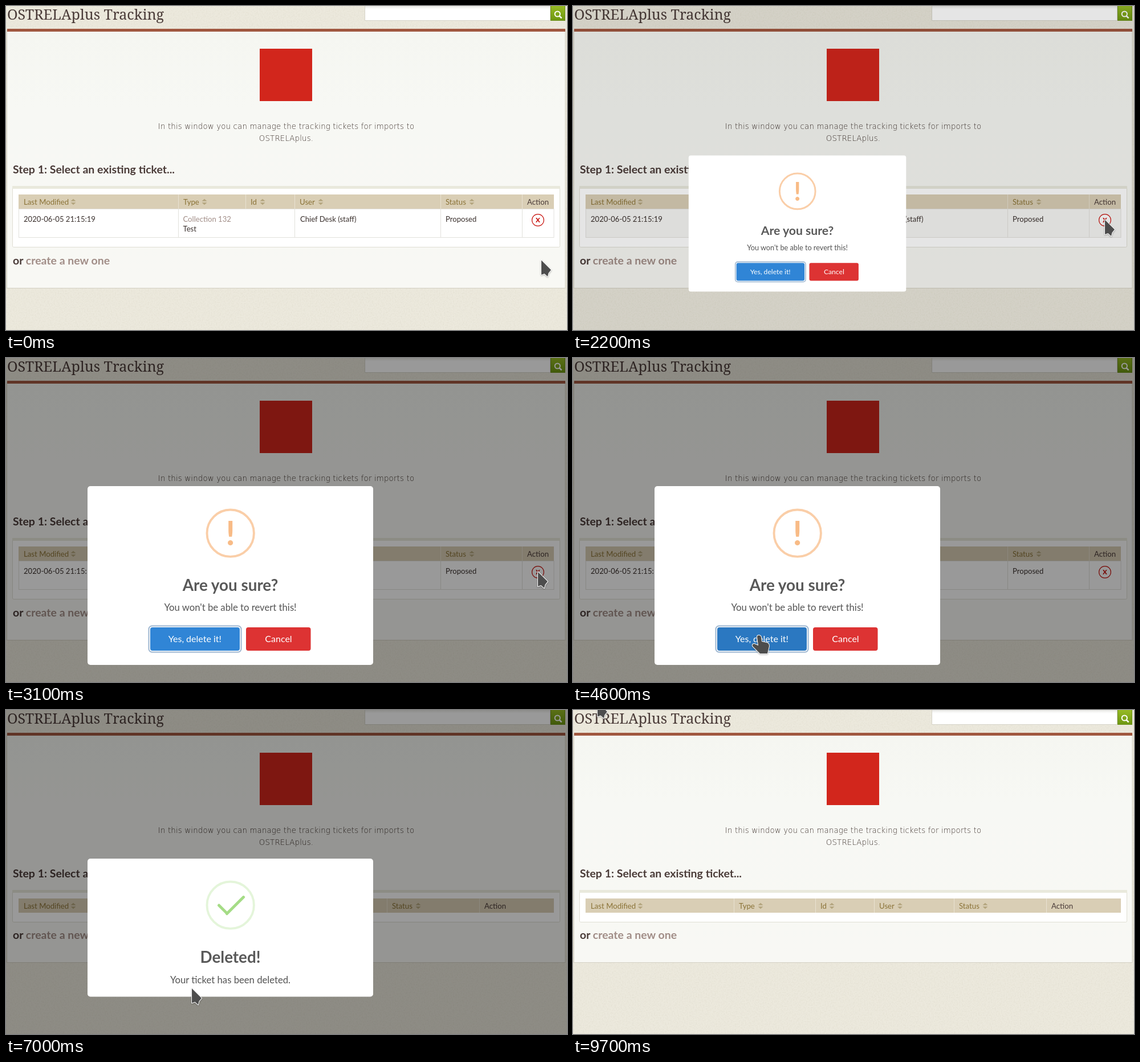
These frames come from a looping animation (984x569 px, 10000 ms). An HTML page:

```html
<!DOCTYPE html>
<html lang="en">
<head>
<meta charset="utf-8">
<title>Ticket tracking</title>
<style>
html, body { margin: 0; width: 100%; height: 100%; overflow: hidden; background: #e9e6da; }
svg { display: block; width: 984px; height: 569px; font-family: Lato, Cabin, sans-serif; }
.title { font: 25.1px "Noto Serif", serif; fill: #4a3b38; }
.intro { font: 200 13.3px "DejaVu Sans", sans-serif; letter-spacing: .18px; fill: #40342f; }
.head { font-size: 19.5px; font-weight: 700; fill: #4a3b38; }
.cell { font-size: 13.1px; fill: #3a302d; }
.th { font-size: 13.2px; fill: #8a7236; }
.link { fill: #a18d87; }
.mid { text-anchor: middle; }
.big { font-size: 27.8px; font-weight: 700; fill: #595959; }
.msg { font-size: 16.7px; fill: #545454; }
.btn { font-size: 16px; fill: #fff; }
#cursor { paint-order: stroke; filter: drop-shadow(0 1px 1px rgba(0,0,0,.3)); }
</style>
</head>
<body>
<svg id="stage" viewBox="0 0 984 569">
  <defs>
    <filter id="grain" x="0" y="0" width="1" height="1">
      <feTurbulence type="fractalNoise" baseFrequency=".45" numOctaves="2" seed="4"/>
      <feColorMatrix values="0 0 0 0 .35  0 0 0 0 .31  0 0 0 0 .2  .2 0 0 0 -.08"/>
    </filter>
    <linearGradient id="paper" x2="0" y2="1">
      <stop offset="0" stop-color="#f5f6f1"/><stop offset=".3" stop-color="#f7f8f4"/>
      <stop offset="1" stop-color="#f8f8f4"/>
    </linearGradient>
    <linearGradient id="green" x2="0" y2="1">
      <stop offset="0" stop-color="#97bb24"/><stop offset="1" stop-color="#6d9611"/>
    </linearGradient>
    <linearGradient id="inset" x2="0" y2="1">
      <stop offset="0" stop-color="#e6e6e2"/><stop offset=".25" stop-color="#fff"/>
    </linearGradient>
  </defs>

  <rect width="984" height="569" fill="#ece9dd"/>
  <rect width="984" height="569" filter="url(#grain)"/>
  <text class="title" x="2" y="23.5">OSTRELAplus Tracking</text>
  <rect x="629.5" y="-.5" width="325" height="26" fill="url(#inset)" stroke="#d5d3c8"/>
  <rect x="955.5" y="-.5" width="25" height="26" fill="url(#green)" stroke="#6f921f"/>
  <g fill="none" stroke="#fff" stroke-width="2">
    <circle cx="967.3" cy="14" r="4.6"/><path d="M970.6 17.3l4 4" stroke-width="2.6"/>
  </g>

  <g id="before"></g>
  <g id="after"></g>
  <rect x="2" y="40" width="979" height="5" fill="#a0573f"/>
  <rect x="445" y="75" width="92" height="92" fill="#d2261c"/>
  <text class="intro mid" x="491.5" y="216">In this window you can manage the tracking tickets for imports to</text>
  <text class="intro mid" x="491.5" y="237">OSTRELAplus.</text>
  <text class="head" x="12" y="294">Step 1: Select an existing ticket...</text>

  <rect id="shade" width="984" height="569"/>

  <g id="ask">
    <rect x="143" y="225" width="501" height="314" rx="5" fill="#fff"/>
    <circle cx="393.7" cy="307.7" r="41.2" fill="none" stroke="#facea8" stroke-width="3.9"/>
    <text class="mid" x="393.7" y="329" font-size="60" font-weight="700" fill="#f8bb86">!</text>
    <text class="big mid" x="393.5" y="408.5">Are you sure?</text>
    <text class="msg mid" x="393.5" y="443.5">You won't be able to revert this!</text>
    <rect id="ring" x="250.5" y="470.5" width="162" height="46" rx="5.5" fill="#fff" stroke="#9db6d0" stroke-width="2"/>
    <rect id="yes" x="253" y="473" width="157" height="41" rx="4"/>
    <text class="btn mid" x="331.3" y="499">Yes, delete it!</text>
    <rect x="421" y="473" width="113.5" height="41" rx="4" fill="#dd3333"/>
    <text class="btn mid" x="478" y="499">Cancel</text>
  </g>

  <g id="done">
    <rect x="143" y="261" width="501" height="242.5" rx="5" fill="#fff"/>
    <g fill="none" stroke="#a5dc86" stroke-width="3.9">
      <circle cx="393.7" cy="342.7" r="41.2" opacity=".3"/>
      <path id="arc"/>
    </g>
    <g transform="translate(354.55 303.55) scale(15.66)" fill="#a5dc86">
      <rect id="tip" height=".3125" rx=".125"/>
      <rect id="long" height=".3125" rx=".125"/>
    </g>
    <text class="big mid" x="393.5" y="443.7">Deleted!</text>
    <text class="msg mid" x="393.5" y="480">Your ticket has been deleted.</text>
  </g>

  <g id="cursor" fill="#4d4d4d" stroke="#fff" stroke-width="2" stroke-linejoin="round">
    <path id="arrow" d="M0 0V25.5L5.5 23.5L11 28.5L12.5 22.5L17 17Z"/>
    <path id="hand" d="M-3 1Q-3 -2 0 -2T4 1L5 9L14 11Q18 12 18 17L15 30H2L-11 17Q-12 13 -8 13L-1 16Z"/>
  </g>
</svg>

<script>
const $ = id => document.getElementById(id);
const set = (id, attrs) => {
  for (const k in attrs) $(id).setAttribute(k, attrs[k]);
};
const show = (id, on) => set(id, { visibility: on ? 'visible' : 'hidden' });
const clamp = x => Math.max(0, Math.min(1, x));
const lerp = (a, b, p) => a + (b - a) * p;
const smooth = x => x * x * (3 - 2 * x);
const part = (t, a, b) => clamp((t - a) / (b - a));

// Page body: the box and everything under it move up by `lift` once the row is gone.
function body(lift, cuts, sorts, row) {
  const names = ['Last Modified', 'Type', 'Id', 'User', 'Status', 'Action'];
  const heads = names.map((name, i) => {
    const x = (i ? cuts[i - 1] : 22) + 9;
    const fill = i == 5 ? ' style="fill:#4a3b38"' : '';
    return `<text class="th" x="${x}" y="348.5"${fill}>${name}</text>`;
  }).join('');
  const lines = cuts.map(x => `M${x + .5} 331v25`).join('');
  const arrows = sorts.map(x => `M${x - 4.5} 342.7l4.5-4 4.5 4zm0 2.6l4.5 4 4.5-4z`).join('');
  return `
    <rect x="1.5" y="42.5" width="979.5" height="${453 - lift}" fill="url(#paper)" stroke="#d3d0c3"/>
    <rect x="11.5" y="316.5" width="960" height="${107 - lift + lift / 52}" rx="2" fill="#fff" stroke="#dfded3"/>
    <rect x="11" y="316" width="961" height="5" rx="1" fill="#e9e9dc"/>
    <rect x="22" y="331" width="939" height="25" fill="#d9ceb5"/>
    <path d="${lines}" stroke="#e9e2d2"/>
    <path d="${arrows}" fill="#b3a47d"/>
    ${heads}${row}
    <text class="head" x="12" y="${453.5 - lift}">or <tspan class="link">create a new one</tspan></text>`;
}

const row = `<g id="row">
  <rect id="rowFill" x="22.5" y="356.5" width="938.5" height="50" stroke="#e2e1dc"/>
  <path d="M302.5 356v51M506.5 356v51M762.5 356v51M905.5 356v51" stroke="#e2e1dc"/>
  <g class="cell">
    <text x="31" y="379">2020-06-05 21:15:19</text>
    <text class="link" x="310.5" y="379">Collection 132</text>
    <text x="310.5" y="396">Test</text>
    <text x="516" y="379">Chief Desk (staff)</text>
    <text x="771" y="379">Proposed</text>
  </g>
  <circle cx="933" cy="376" r="10.4" fill="#fff" stroke="#c8140f" stroke-width="1.2"/>
  <text class="mid" x="933" y="380.2" font-size="15" font-weight="700" fill="#c8140f">x</text>
</g>`;

$('before').innerHTML = body(0, [302, 420, 506, 762, 905], [118, 348, 450, 552, 817], row);
$('after').innerHTML = body(52, [282, 425, 528, 668, 830], [118, 329, 454, 573.5, 723], '');

// Popup bounce: .7 -> 1.05 -> .95 -> 1 within 300 ms.
function bounce(ms) {
  const seg = (a, b, from, to) => lerp(from, to, smooth(part(ms, a, b)));
  if (ms < 135) return seg(0, 135, .7, 1.05);
  if (ms < 240) return seg(135, 240, 1.05, .95);
  return seg(240, 300, .95, 1);
}
const zoom = s => `translate(393.7 382) scale(${s}) translate(-393.7 -382)`;

// Keys are [time, x, y, width].
function along(keys, p) {
  if (p <= keys[0][0]) return keys[0];
  const i = keys.findIndex(k => k[0] >= p);
  if (i < 0) return keys[keys.length - 1];
  const [a, b] = [keys[i - 1], keys[i]];
  const q = smooth(part(p, a[0], b[0]));
  return a.map((v, j) => lerp(v, b[j], q));
}
const tipKeys = [[.54, .0625, 1.1875, 0], [.7, -.375, 2.1875, 3.125], [.84, 1.3125, 3, 1.0625], [1, .875, 2.8125, 1.5625]];
const longKeys = [[.65, 2.125, 3.375, 0], [.84, 1.5625, 2.1875, 3.4375], [1, 1.5625, 2.375, 2.9375]];

function stroke(id, keys, p, angle) {
  const [, x, y, width] = along(keys, p);
  set(id, { x, y, width, transform: `rotate(${angle} ${x + width / 2} ${y + .156})` });
}

function drawIcon(ms) {
  const turn = 2 * Math.pow(part(ms, 212, 510), 1.7);
  const from = 54 - 191 * Math.min(1, turn);
  const to = 54 - 191 * Math.max(0, turn - 1);
  const point = deg => {
    const a = deg * Math.PI / 180;
    return `${393.7 + 41.2 * Math.cos(a)} ${342.7 + 41.2 * Math.sin(a)}`;
  };
  const big = to - from > 180 ? 1 : 0;
  set('arc', { d: to - from > .5 ? `M${point(from)}A41.2 41.2 0 ${big} 1 ${point(to)}` : '' });
  stroke('tip', tipKeys, ms / 750, 45);
  stroke('long', longKeys, ms / 750, -45);
}

function cursorAt(t) {
  const go = (a, b, from, to, ease = smooth) => {
    const p = ease(part(t, a, b));
    return [lerp(from[0], to[0], p), lerp(from[1], to[1], p)];
  };
  const cross = [933, 375.5], edge = [347, 468], yes = [326, 489];
  if (t < 3200) return go(700, 1600, [939, 446.5], cross);
  if (t < 4300) return go(3200, 4300, cross, edge);
  if (t < 8700) return go(4300, 4600, edge, yes, x => x * (2 - x));
  const p = smooth(part(t, 8700, 9700)), q = 1 - p;
  const bend = (a, b, c) => a * q * q + 2 * b * p * q + c * p * p;
  return [bend(326, -40, 43), bend(489, 150, -14)];
}

function draw(t) {
  const gone = t >= 6900;
  show('before', !gone);
  show('after', gone);
  set('row', { opacity: 1 - smooth(part(t, 5650, 6600)) });
  set('rowFill', { fill: t >= 1000 && t < 2300 ? '#f6f6f4' : '#fff' });

  const open = t >= 2200 && t < 7800;
  set('shade', { opacity: open ? (t < 2300 ? .1 : .4) : 0 });

  // Both popups hold their last bounce for a moment before settling.
  const asking = open && t < 5500;
  show('ask', asking);
  set('ask', { transform: zoom(t < 3100 ? bounce(Math.min(t, 2400) - 2164) : 1) });
  show('ring', asking && t < 5300);
  set('yes', { fill: t >= 5300 ? '#266aab' : t >= 4400 ? '#2b78c1' : '#3085d6' });

  show('done', open && !asking);
  const ms = (t < 5800 ? Math.min(t, 5600) : t) - 5388;
  set('done', { transform: zoom(bounce(ms)) });
  drawIcon(ms);

  const pointing = t >= 1400 && t < 2000 || t >= 4400 && t < 5500;
  show('hand', pointing);
  show('arrow', !pointing);
  set('cursor', { transform: `translate(${cursorAt(t)})` });
}

const start = performance.now();
let last = -1;
function tick() {
  const t = Math.floor((performance.now() - start) % 10000 / 100) * 100;
  if (t !== last) draw(last = t);
  requestAnimationFrame(tick);
}
tick();
</script>
</body>
</html>
```
